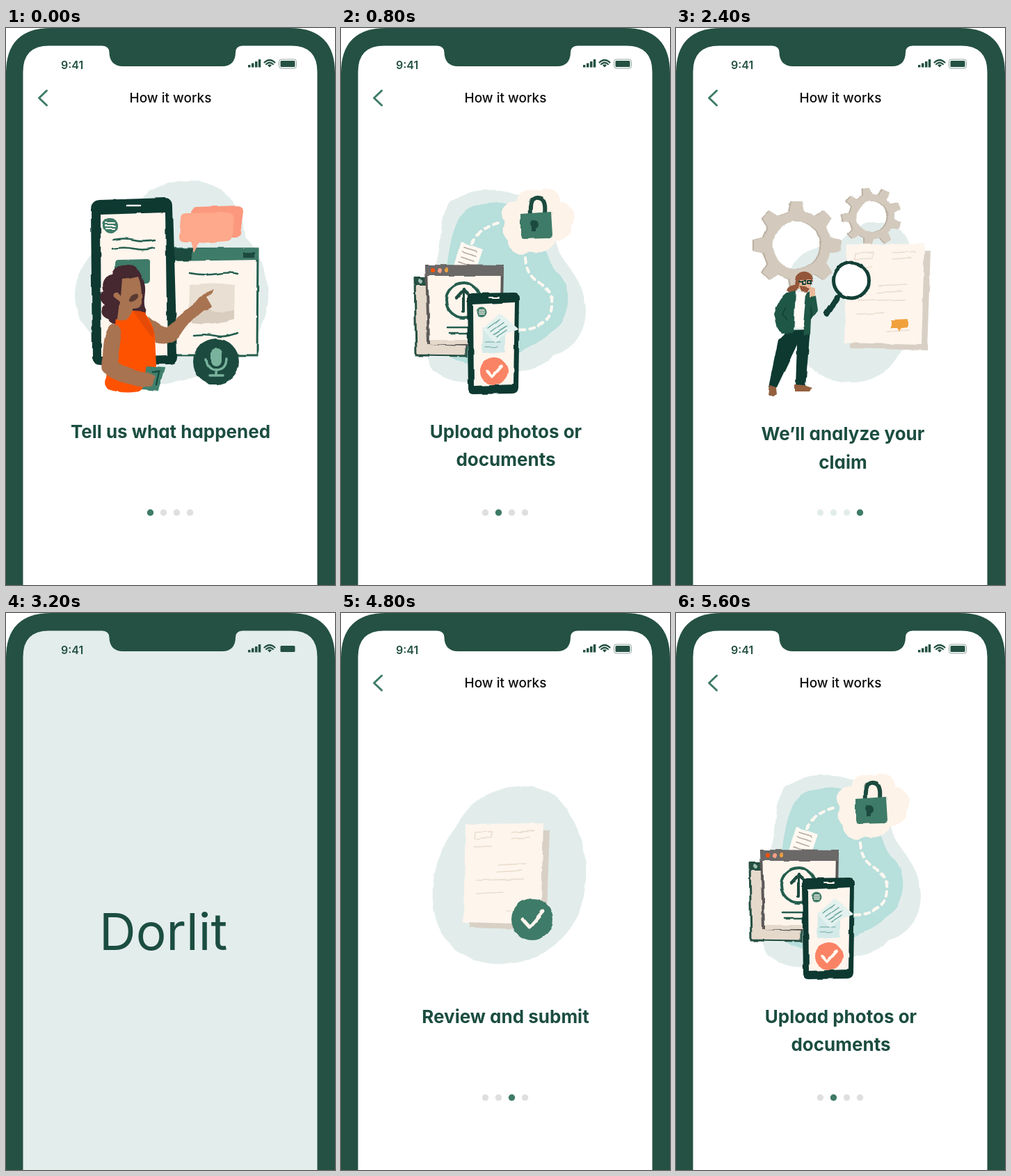
An HTML page for the animation above (6.4 s loop, 473 px wide and 800 px high).

```html
<!DOCTYPE html>
<html lang="en">
<head>
<meta charset="utf-8">
<title>How it works</title>
<style>
  html, body { margin: 0; width: 100%; height: 100%; overflow: hidden; background: #fff; }
  svg { display: block; width: 473px; height: 800px; }
  text { font-family: Inter, Roboto, sans-serif; }
  .title text { font-size: 26px; font-weight: 700; fill: #1b4d40; text-anchor: middle; font-feature-settings: "cv11"; }
  .art { filter: url(#wobble); }
  .line { fill: none; stroke-linecap: round; stroke-linejoin: round; }
  .mist { fill: #e2edeb; }
  .cream { fill: #fef5ed; }
  .night { fill: #0d3931; }
  .deep { fill: #1c4a3f; }
  .leaf { fill: #3e7b68; }
  .skin { fill: #a87350; }
  .slide { visibility: hidden; }
</style>
</head>
<body>
<svg viewBox="0 0 473 800">
  <defs>
    <filter id="wobble" x="-5%" y="-5%" width="110%" height="110%" color-interpolation-filters="sRGB">
      <feTurbulence type="fractalNoise" baseFrequency=".06" numOctaves="1" seed="4"/>
      <feDisplacementMap in="SourceGraphic" scale="4" xChannelSelector="R" yChannelSelector="G"/>
    </filter>
    <g id="menu">
      <circle r="11" class="leaf"/>
      <path class="line" stroke="#fef5ed" stroke-width="2" d="M-6-4H6M-7 0H7M-6 4H6"/>
    </g>
    <g id="sheets">
      <path fill="#d9d0c5" d="M252 320H366L361 463 251 460Z"/>
      <path class="cream" d="M245 311L357 310 353 455 242 452Z"/>
      <path class="line" stroke="#eaddce" stroke-width="1.6" d="M258 323L283 322 282 331 257 332ZM311 323L344 321M311 332L338 330M257 344L282 343M292 370L332 368M290 380L325 378M262 392L329 390M261 411L299 409M304 436L335 434"/>
    </g>
  </defs>

  <path fill="#245143" d="M0 800V65Q0 0 65 0H408Q473 0 473 65V800Z"/>
  <path id="screen" fill="#fff" d="M24.500 800V63Q24.500 25.500 62 25.500H138Q148.500 26 148.500 35C148.500 48 156 55 168 55H311C323 55 330 48 330 35Q330 26 340 25.500H410Q447.500 25.500 447.500 63V800Z"/>

  <g fill="#245143">
    <text x="79" y="59" font-size="16" font-weight="600">9:41</text>
    <path d="M348 53h3.500v3.500h-3.500zM353 50.500h3.500v6h-3.500zM358 48h3.500v8.500h-3.500zM362.800 45h3.500v11.500h-3.500z"/>
    <path d="M376 53.500Q379 51 382 53.500L379 56.500Z"/>
    <path class="line" stroke="#245143" stroke-width="2.200" stroke-linecap="butt" d="M371.500 49.500Q379 42.500 386.500 49.500M374 52Q379 47.500 384 52"/>
    <rect x="394.500" y="47" width="21" height="9" rx="1.500"/>
  </g>

  <g id="chrome">
    <rect x="392.500" y="45" width="25" height="13" rx="3.500" fill="none" stroke="#8fa69f"/>
    <path class="line" stroke="#3e7b68" stroke-width="3" d="M58.500 90L47.500 100.500 58.500 111"/>
    <text x="236.500" y="107" text-anchor="middle" font-size="19" font-weight="500" fill="#0b0b0b">How it works</text>
    <g id="dots"></g>
  </g>

  <g class="slide">
    <g class="art">
      <path class="mist" d="M122 326C150 305 175 290 183 262C198 232 230 219 265 219C312 220 342 255 343 300C370 328 378 360 377 392C373 432 350 460 330 470C300 500 230 515 190 515C150 510 160 470 135 450C95 420 85 370 122 326Z"/>
      <path class="cream" stroke="#235d4d" stroke-width="3" d="M238 317H362L361 470 240 470Z"/>
      <path class="leaf" d="M238 317L363 316V333L238 335Z"/>
      <path class="deep" d="M238 317H270L266 334H238ZM340 322H357V330H340Z"/>
      <path class="line" stroke="#235d4d" stroke-width="2.500" d="M264 352Q285 356 304 353T333 353M269 441Q288 439 302 442T333 438"/>
      <path fill="#e9dfd3" d="M264 369Q296 364 329 369L328 414Q328 419 322 418L268 417Q262 417 263 410Z"/>
      <path fill="#d9cdbf" d="M267 401C284 397 297 415 328 406V418Q292 428 267 424Z"/>
      <path fill="#fb987d" d="M272 257L334 255Q342 256 341 264L337 295Q336 301 329 301H270L266 264Q266 258 272 257Z"/>
      <path fill="#fea88c" d="M257 266L322 265Q329 266 328 273L326 299Q325 305 319 306L278 309 271 323 266 308H256Q249 307 249 300L251 273Q251 267 257 266Z"/>
      <path class="night" d="M134 247L228 244Q240 244 240 256L246 471Q247 482 236 483L136 484Q126 484 124 474L122 261Q122 248 134 247Z"/>
      <path class="cream" d="M136 268L229 265 232 470 137 473Z"/>
      <path class="line" stroke="#fef5ed" stroke-width="2.500" d="M174 255H193"/>
      <use href="#menu" x="150" y="284"/>
      <path class="line" stroke="#235d4d" stroke-width="2.500" d="M155 304Q170 301 184 304T213 304M153 317Q170 314 184 317T213 316"/>
      <path class="leaf" d="M161 333L204 332Q208 333 207 338V361Q207 367 201 367H163Q157 366 157 360V339Q157 333 161 333Z"/>
      <path fill="#452830" d="M171 341C181 337 192 346 196 359C205 376 196 387 200 402C202 414 192 423 181 418C172 430 154 429 147 418C136 414 135 405 142 398C133 390 133 382 141 377C136 366 143 355 153 354C155 345 163 340 171 341Z"/>
      <path class="skin" d="M167 360Q180 359 191 356Q197 372 196 396Q193 405 182 404V418L159 427 163 393Q152 389 155 382Q160 378 165 385Z"/>
      <ellipse cx="184" cy="387" rx="8" ry="4" fill="#5a3a32" transform="rotate(-30 184 387)"/>
      <path class="skin" d="M204 414Q222 430 231 430Q253 409 272 395Q282 381 298 375Q300 379 288 386L296 400Q291 407 283 405Q266 418 248 445Q233 457 215 452Z"/>
      <path fill="#ff5200" d="M158 419Q174 424 182 407L198 408Q211 422 214 442L216 486Q211 510 192 522Q168 526 147 519Q139 512 144 502Z"/>
      <path fill="#e54a08" d="M183 408L198 408 213 436 211 446Z"/>
      <path fill="#40816e" d="M202 486L228 488 219 521 196 519Z"/>
      <path class="line" stroke="#174c40" stroke-width="2.500" d="M211 494H220L216 512"/>
      <path class="skin" d="M153 425Q164 425 166 439L160 480Q180 493 207 496L215 500 209 513 197 516Q155 508 140 495Q135 490 139 473Q140 432 153 425Z"/>
      <circle cx="302" cy="479" r="33" class="deep"/>
      <rect x="295" y="460" width="15" height="26" rx="7.500" fill="#79b39d"/>
      <path class="line" stroke="#79b39d" stroke-width="3.500" d="M288 476Q289 491 302 491Q316 491 317 476M302 491V499M293 499H312"/>
    </g>
    <g class="title"><text x="236.500" y="588.500">Tell us what happened</text></g>
  </g>

  <g class="slide">
    <g class="art">
      <path class="mist" d="M158 250C178 234 205 230 230 234C280 240 305 285 312 318C322 342 350 360 352 405C352 440 332 463 305 470C285 495 250 490 225 501C195 513 155 512 133 492C113 465 120 390 134 345C148 315 138 270 158 250Z"/>
      <path fill="#b7dfdc" d="M181 261C200 248 240 245 262 264C292 290 290 320 307 347C330 365 331 398 318 420C300 446 275 456 255 466C220 486 180 490 153 470C127 445 145 380 152 344C156 315 160 278 181 261Z"/>
      <path fill="#fef3e9" d="M253 249C252 234 274 228 287 234C301 226 316 236 315 250C335 252 341 272 331 284C333 300 316 307 307 306C302 323 281 324 272 321C256 331 238 319 240 305C228 295 237 281 235 276C223 261 240 248 253 249Z"/>
      <path class="line" stroke="#1c4a3f" stroke-width="6" d="M272 268Q270 242 284 244Q295 245 293 266"/>
      <path class="leaf" d="M258 267L302 264 304 297Q303 303 297 302L263 303Q258 302 258 297Z"/>
      <path class="deep" d="M272 282A6 6 0 1 1 280 288L281 293H274L274 287Z"/>
      <path class="line" stroke="#fff8f0" stroke-width="4" stroke-dasharray="7 7" d="M188 309Q202 285 230 279M265 330C268 373 298 359 303 390C306 423 282 434 252 434"/>
      <path fill="#fff9f2" d="M173 307L204 318 193 350 162 341Z"/>
      <path class="line" stroke="#b6aaa0" stroke-width="1.700" d="M177 315L195 321M174 322L194 328M172 329L191 335M169 336L184 341"/>
      <path fill="#e5d9cc" stroke="#254f42" stroke-width="3" d="M106 360L180 358V471L108 470Z"/>
      <path fill="#254f42" d="M105 358H180V370H105Z"/>
      <circle cx="114" cy="364" r="3" fill="#9fbdb1"/>
      <path class="cream" stroke="#5b5957" stroke-width="4" d="M123 342L232 343 230 456 126 452Z"/>
      <path fill="#6b6967" d="M122 341H233V356H122Z"/>
      <circle cx="132" cy="348" r="3" fill="#ff5200"/>
      <circle cx="142" cy="348" r="3" fill="#fca085"/>
      <circle cx="152" cy="348" r="3" fill="#f2a140"/>
      <path fill="#e5d9cc" d="M128 448H184V454H128Z"/>
      <circle cx="176" cy="391" r="25" fill="none" stroke="#235d4d" stroke-width="4"/>
      <path class="line" stroke="#1c4a3f" stroke-width="4" d="M176 407V376M165 388L176 376 188 387"/>
      <path class="line" stroke="#235d4d" stroke-width="2.500" d="M153 430H182M155 438H182"/>
      <path class="night" d="M188 381L249 380Q257 380 257 389L255 517Q254 525 246 525L190 526Q183 526 183 518L181 390Q181 382 188 381Z"/>
      <path class="cream" d="M190 397L250 394 248 512 191 514Z"/>
      <path class="line" stroke="#fef5ed" stroke-width="2" d="M213 387H226"/>
      <use href="#menu" transform="translate(202 408) scale(.68)"/>
      <path fill="#d4eae8" d="M204 430H236V466L203 468Z"/>
      <path class="line" stroke="#8dbcb8" stroke-width="1.500" d="M208 451H229M208 458H225"/>
      <path fill="#e3f1ef" d="M229 410L256 433 239 438 221 452 203 432Z"/>
      <path class="line" stroke="#6ba69d" stroke-width="1.500" d="M211 431L228 419M215 436L233 423M219 440L238 428M223 444L238 434"/>
      <circle cx="220" cy="493" r="20" fill="#fa8365"/>
      <path class="line" stroke="#fff8f0" stroke-width="3.500" d="M210 493L217 501 231 485"/>
    </g>
    <g class="title"><text x="237" y="588.500">Upload photos or</text><text x="237" y="629">documents</text></g>
  </g>

  <g class="slide">
    <g class="art">
      <path class="mist" d="M170 300C195 250 275 230 315 270C350 310 365 375 340 435C310 500 225 525 165 485C115 440 125 355 170 300Z"/>
      <use href="#sheets" x="-66" y="-8"/>
      <circle cx="275" cy="440" r="30" class="leaf"/>
      <path class="line" stroke="#fef5ed" stroke-width="5" d="M261 440L271 451 290 429"/>
    </g>
    <g class="title"><text x="236.500" y="588.500">Review and submit</text></g>
  </g>

  <g class="slide">
    <g class="art">
      <path class="mist" d="M171 335C190 310 220 318 240 303C262 278 290 272 318 287C341 300 338 330 342 360C347 410 341 450 313 480C290 512 240 517 210 499C180 486 170 450 166 415C160 385 157 355 171 335Z"/>
      <g id="gears"></g>
      <use href="#sheets"/>
      <path fill="#f1a13c" d="M309 419L333 418V430L324 431 322 436 318 431H309Z"/>
      <path class="line" stroke="#123f36" stroke-width="9" d="M231 388L217 410"/>
      <path class="line" stroke="#123f36" stroke-width="5" d="M237 381L230 390"/>
      <circle cx="252" cy="362.500" r="25.500" fill="#fff" stroke="#123f36" stroke-width="5"/>
      <path fill="#94563a" d="M172 357Q179 347 190 351Q198 355 197 363L192 377 174 375Q167 384 159 377Q161 370 170 369Z"/>
      <path fill="#e9b99a" d="M178 361L195 361 193 377 182 380 175 374Z"/>
      <path fill="#94563a" d="M176 371Q187 372 193 374L189 381 180 379Z"/>
      <path class="line" stroke="#123f36" stroke-width="2" d="M176 364L182 365M182 363H187V368H182ZM190 363H195V367H190Z"/>
      <path class="night" d="M160 434L193 433 186 515H172L174 455 145 516H133L147 448 158 437Z"/>
      <path fill="#fffaf5" d="M172 379L189 380 184 430 171 431Z"/>
      <path fill="#1f5746" d="M172 377L169 438 151 439 146 431 141 410Q147 389 160 380ZM187 382L193 378 201 385 204 405 194 418 193 440 185 441 183 425Z"/>
      <path class="line" stroke="#123f36" stroke-width="1.500" d="M158 401L153 411 160 420M194 401V417"/>
      <path fill="#e9b99a" d="M193 371L200 374 200 385 193 386Z"/>
      <path fill="#95603f" d="M134 513L144 516 145 525 138 529 132 526ZM170 512L184 513 196 517 193 522 170 522Z"/>
    </g>
    <g class="title"><text x="240" y="592">We’ll analyze your</text><text x="240" y="632.500">claim</text></g>
  </g>

  <g class="slide">
    <text x="134" y="484" font-size="73" fill="#1b4d40">Dorlit</text>
  </g>
</svg>
<script>
const SVG = "http://www.w3.org/2000/svg", STEP = 800;
const ORDER = [0, 1, 2, 3, 4, 3, 2, 1];
const byId = id => document.getElementById(id);
const slides = document.querySelectorAll(".slide");

function add(parent, tag, attrs) {
  const el = document.createElementNS(SVG, tag);
  for (const key in attrs) el.setAttribute(key, attrs[key]);
  return parent.appendChild(el);
}

// Toothed ring: each tooth is a trapezoid, the hole is cut by even-odd fill.
function gear(x, y, outer, root, hole, teeth, turn, fill) {
  const pitch = 2 * Math.PI / teeth, points = [];
  for (let i = 0; i < teeth; i++)
    for (const [r, offset] of [[root, -.28], [outer, -.15], [outer, .15], [root, .28]]) {
      const a = turn * Math.PI / 180 + (i + offset) * pitch;
      points.push(`${x + r * Math.cos(a)} ${y + r * Math.sin(a)}`);
    }
  const ring = `M${x - hole} ${y}a${hole} ${hole} 0 1 0 ${2 * hole} 0a${hole} ${hole} 0 1 0 ${-2 * hole} 0Z`;
  add(byId("gears"), "path", { d: `M${points.join("L")}Z${ring}`, fill, "fill-rule": "evenodd", stroke: fill, "stroke-linejoin": "round" });
}
for (const [shift, fill] of [[-2, "#b9ae9f"], [0, "#d3cabd"]]) {
  gear(174 + shift, 312, 63, 49, 35, 8, -90, fill);
  gear(282 + shift, 271, 42, 32, 23, 9, -102, fill);
}

const dots = [0, 1, 2, 3].map(i => add(byId("dots"), "circle", { cx: 207.5 + 19 * i, cy: 696, r: 4.7 }));

function draw() {
  const current = ORDER[Math.floor(performance.now() / STEP) % ORDER.length];
  const splash = current === 4;
  slides.forEach((slide, i) => slide.style.visibility = i === current ? "visible" : "hidden");
  dots.forEach((dot, i) => dot.setAttribute("fill", i === current ? "#3e7b68" : current === 3 ? "#e2edeb" : "#dfdfdf"));
  byId("chrome").style.visibility = splash ? "hidden" : "visible";
  byId("screen").setAttribute("fill", splash ? "#e3edeb" : "#fff");
  requestAnimationFrame(draw);
}
draw();
</script>
</body>
</html>
```
